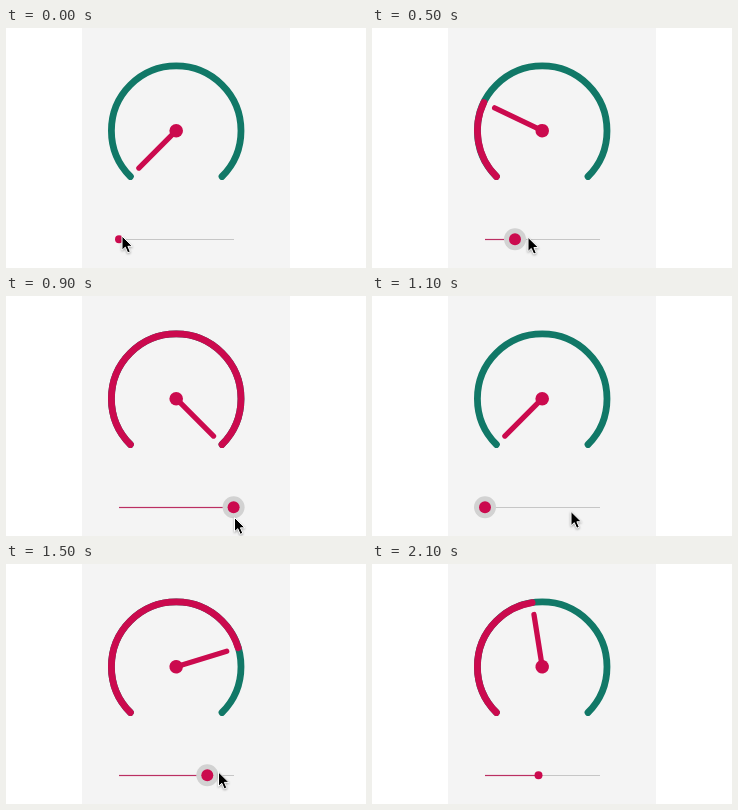
An HTML page for the animation above (2400 ms loop, 360x240 px).

```html
<!DOCTYPE html>
<html lang="en">
<head>
<meta charset="utf-8">
<title>Gauge with slider</title>
<style>
  html, body { margin: 0; width: 100%; height: 100%; overflow: hidden; background: #fff; }
  svg { display: block; }
  .line { fill: none; stroke-linecap: round; stroke-width: 6.8; }
  .red { fill: #cb0a4e; }
  #cursor { filter: drop-shadow(0 1px 1px #0005); }
</style>
</head>
<body>
<svg width="360" height="240" viewBox="0 0 360 240">
  <rect x="76" width="208" height="240" fill="#f4f4f4"/>
  <path class="line" stroke="#117867" d="M124.4 148.5A64.8 64.8 0 1 1 216 148.5"/>
  <path class="line" id="arc" stroke="#cb0a4e" pathLength="270" d="M124.4 148.5A64.8 64.8 0 1 1 216 148.5"/>
  <g id="needle" class="red">
    <path class="line" style="stroke-width:5.3" stroke="#cb0a4e" d="M170.2 102.7h-52.8"/>
    <circle cx="170.2" cy="102.7" r="6.8"/>
  </g>
  <rect x="113" y="211" width="115" height="1" fill="#c6c6c6"/>
  <rect id="fill" x="113" y="210.9" height="1.2" fill="#bb2f62"/>
  <circle id="halo" cy="211.3" r="11" fill="#d2d2d2"/>
  <circle id="thumb" class="red" cy="211.3"/>
  <path id="cursor" d="M0 0V14.2L3.3 11.2L5.7 16.8L8.3 15.7L5.9 10.3H10.4Z" stroke="#fff"/>
</svg>
<script>
const [arc, needle, fill, halo, thumb, cursor] =
  ["arc", "needle", "fill", "halo", "thumb", "cursor"].map(id => document.getElementById(id));
const STEP = 100, LOOP = 2400, END = 2100;
const LEFT = 113, RIGHT = 227.6;
const LAG = 75, RELEASE = 1700;

// Turning points of the pointer: time, x
const path = [
  [-100, 112], [0, 116], [350, 130], [500, 156], [530, 226], [900, 228.5],
  [1025, 112], [1125, 228], [1200, 227.5], [1300, 145], [1340, 101],
  [1425, 201.3], [1500, 212.5], [1550, 226], [1625, 166.5], [1700, 167.5],
  [1800, 140], [2000, 213]
];

function pointerX(t) {
  const k = Math.max(1, path.findIndex(([time]) => time >= t));
  const [[t0, x0], [t1, x1]] = [path[k - 1], path[k]];
  return x0 + (x1 - x0) * (t - t0) / (t1 - t0);
}

// The pointer sags below the track around the long stop at the right end
const pointerY = t => 208 + 13.5 * Math.exp(-(((t - 900) / 260) ** 2));

const show = (el, on) => el.style.display = on ? "" : "none";

function draw(now) {
  const t = Math.min(Math.floor(now % LOOP / STEP) * STEP, END);
  const dragged = pointerX(Math.min(t, RELEASE) - LAG);
  const x = Math.min(RIGHT, Math.max(LEFT, dragged));
  const angle = (x - LEFT) / (RIGHT - LEFT) * 270;
  const held = t > 0 && t <= RELEASE;

  show(arc, angle > 0.1);
  arc.setAttribute("stroke-dasharray", `${angle} 999`);
  needle.setAttribute("transform", `rotate(${angle - 45} 170.2 102.7)`);
  fill.setAttribute("width", x - LEFT);
  thumb.setAttribute("cx", x);
  thumb.setAttribute("r", held ? 6 : 4);
  halo.setAttribute("cx", x);
  show(halo, held);
  show(cursor, t < END);
  if (t < END) cursor.setAttribute("transform", `translate(${pointerX(t)} ${pointerY(t)})`);
}

const start = performance.now();
function tick() {
  draw(performance.now() - start);
  requestAnimationFrame(tick);
}
tick();
</script>
</body>
</html>
```
